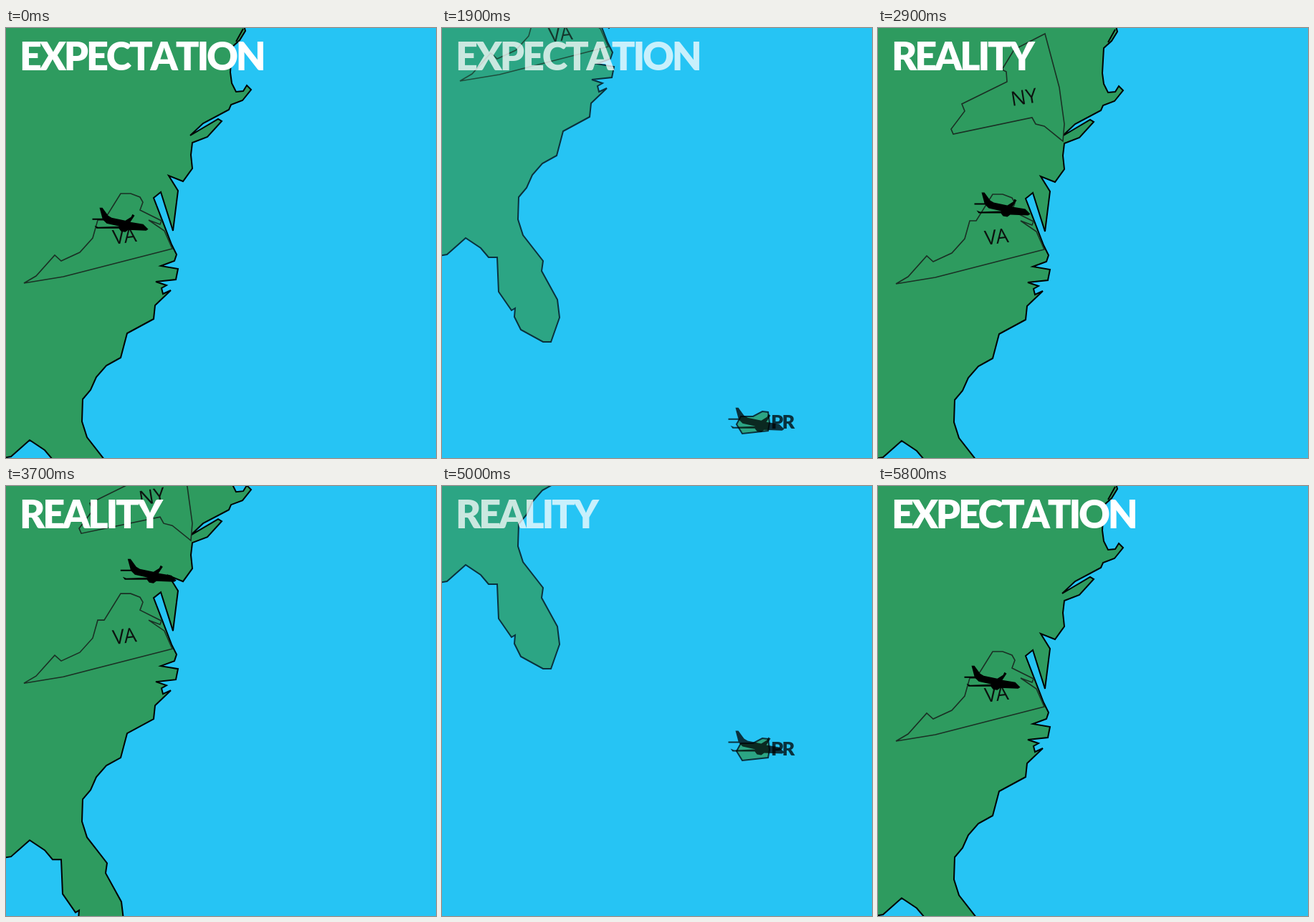
Write an HTML page that moves like this. It is 600 by 600 pixels and loops after 5900 ms.

```html
<!DOCTYPE html>
<html lang="en">
<head>
<meta charset="utf-8">
<title>Expectation and reality</title>
<style>
  html, body { margin: 0; width: 100%; height: 100%; overflow: hidden; background: #26c4f4; }
  svg { display: block; width: 600px; height: 600px; }
  .land { fill: #2e9b5f; stroke: #000; stroke-width: 2; }
  .state { fill: none; stroke: #1a3024; stroke-width: 1.6; }
  #ny .state { fill: #2e9b5f; }
  .label { font: 28px "Open Sans", "Noto Sans", sans-serif; fill: #0c120f; }
  .bold { font: 900 27px Lato, sans-serif; font-kerning: none; letter-spacing: -1.6px; }
  #title { font-size: 54px; letter-spacing: -3.2px; fill: #fff; }
</style>
</head>
<body>
<svg viewBox="0 0 600 600">
  <g id="map">
    <path class="land fade" d="M-5-10H330L334 5 326 18 315 28 313 63 315 78 321 90 331 89 336 81 342 87 330 102 314 108 311 115 275 134 257 151 296 128 301 131 281 153 260 161 258 178 260 197 247 215 227 207 240 228 233 284 216 230 206 238 231 303 238 317 235 326 216 333 240 337 237 352 209 355 224 360 217 364 219 372 230 367 208 388 206 407 169 427 160 461 140 472 126 488 118 506 107 519 106 550 113 572 141 608 139 622 161 662 164 687 152 721H141L110 704 101 686 102 674 97 677 79 651 77 603H65L54 590 33 576 7 599-5 601ZM331 2 321 20"/>
    <path class="state fade" d="M25 357 42 347 68 318 77 326 103 314 121 294 128 269H137L160 232H174L187 237 191 244 187 255 217 270 215 275 199 269 221 284 232 309 80 348Z"/>
    <text class="label fade" transform="translate(150 303) rotate(-7)">VA</text>
    <g id="ny">
      <path class="state fade" d="M233 8 253 83 260 134 258 158 232 137 220 134 215 125 105 148 102 141 121 116 117 106 180 75 179 61 173 58 190 30Z"/>
      <text class="label fade" transform="translate(187 109) rotate(-9)">NY</text>
    </g>
    <path class="land fade" d="M417 825H434L447 818 455 819 457 834 455 845 419 849 411 836Z"/>
    <text class="bold fade" x="459" y="842">PR</text>
  </g>
  <path id="plane" class="fade" d="M10 0H14L22 11 27 14 46 18 54 13 56 9 59 11 53 20 71 23 78 30 75 32 50 31 46 34 40 33 37 29H6L3 25 8 27 38 26 20 22 15 17 0 17V15H14Z"/>
  <text id="title" class="bold fade" x="19" y="59"></text>
</svg>
<script>
const LOOP = 5900, STEP = 100, FADE = 400;
const $ = id => document.getElementById(id);
const fading = document.querySelectorAll('.fade');

const ramp = (t, start, length) => Math.min(1, Math.max(0, (t - start) / length));
const ease = (...span) => (1 - Math.cos(Math.PI * ramp(...span))) / 2;

// Straight flight, the map catching up late
function direct(t) {
  const go = 279 * (1 - (1 - ramp(t, 0, 1400)) ** 1.25);
  const pan = -1 - 282 * ramp(t, 600, 800) ** 4;
  return { x: 120.5 + go, y: 250.7 + go, pan };
}

// First north, then south-east with the map
function detour(t) {
  const north = 164 * ease(t, 2740, 960);
  const go = 265 * ease(t, 3488, 1060);
  const pan = -466 * ease(t, 3455, 890);
  return { x: 134.5 + go, y: 240.5 - north + go, pan };
}

function draw(now) {
  const t = Math.floor(now % LOOP / STEP) * STEP;
  const real = t > 2200 && t < 5400;
  const scene = real ? detour(t) : direct(t < 5400 ? t : 0);
  const opacity = 1 - ramp(t, 1800, FADE) + ramp(t, 2200, FADE)
                    - ramp(t, 4900, FADE) + ramp(t, 5400, FADE);

  $('title').textContent = real ? 'REALITY' : 'EXPECTATION';
  $('ny').style.display = real ? '' : 'none';
  $('map').setAttribute('transform', `translate(0 ${scene.pan})`);
  $('plane').setAttribute('transform', `translate(${scene.x} ${scene.y})`);
  for (const el of fading) el.style.opacity = opacity;
}

const start = performance.now();
function tick() {
  draw(performance.now() - start);
  requestAnimationFrame(tick);
}
tick();
</script>
</body>
</html>
```
